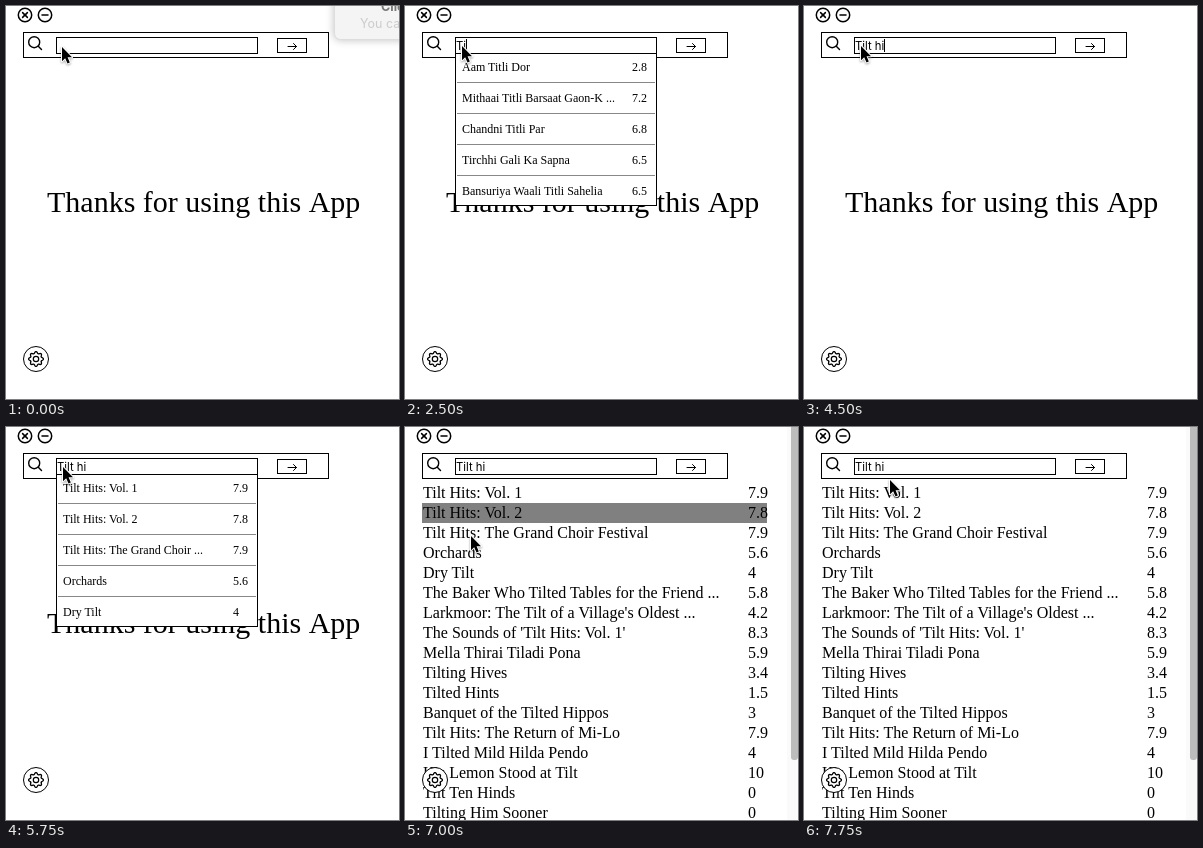
These frames come from a looping animation (393x393 px, 8 s). An HTML page:

```html
<!DOCTYPE html>
<html lang="en">
<head>
<meta charset="utf-8">
<title>Movie search</title>
<style>
  html, body { margin: 0; height: 100%; overflow: hidden; background: #fff; }
  svg { display: block; width: 100%; height: 100%; }
  text { font-family: "Liberation Serif", "Times New Roman", serif; white-space: pre; }
  .ui { font-family: Inter, sans-serif; }
  .line { fill: none; stroke: #000; }
  .box { fill: #fff; stroke: #000; }
  .round { stroke-linecap: round; stroke-linejoin: round; }
  #thanks { font-kerning: none; }
  #cursor { filter: drop-shadow(0 1px 1px rgba(0, 0, 0, .35)); }
</style>
</head>
<body>
<svg viewBox="0 0 393 393">
  <defs>
    <filter id="blur" x="-30%" y="-50%" width="160%" height="200%"><feGaussianBlur stdDeviation="4"/></filter>
  </defs>
  <text id="thanks" x="41" y="206" font-size="30">Thanks for using this App</text>

  <g id="results">
    <rect id="hover" x="17" width="345" height="20" fill="#808080"/>
    <g id="rows" font-size="16"></g>
    <rect x="382" width="11" height="393" fill="#fafafa"/>
    <rect x="386" y="-6" width="7" height="339" rx="3" fill="#bcbcbc"/>
  </g>

  <g class="line round" stroke-width="1.5">
    <circle cx="19" cy="9" r="6.7"/>
    <path d="M16.6 6.6l4.8 4.8m0-4.8l-4.8 4.8"/>
    <circle cx="39" cy="9" r="6.7"/>
    <path d="M36 9h6"/>
  </g>

  <rect class="line" x="17.5" y="26.5" width="305" height="25"/>
  <g class="line round" stroke-width="1.4">
    <circle cx="28.2" cy="36.2" r="5.5"/>
    <path d="M32.3 40.3l3.2 3.2"/>
  </g>
  <rect class="box" x="271.5" y="32.5" width="29" height="14"/>
  <path class="line round" d="M282 40.5h8.5m-3-3l3 3-3 3"/>
  <rect class="box" x="50.5" y="31.5" width="201" height="16"/>
  <text id="query" class="ui" x="51" y="44" font-size="11.3"></text>
  <rect id="caret" y="33" width="1" height="13"/>

  <g id="drop">
    <rect class="box" x="50.5" y="47.5" width="201" height="152"/>
    <path d="M52 76.5H250M52 107.5H250M52 138.5H250M52 169.5H250" stroke="#888"/>
    <g id="hints" font-size="12"></g>
  </g>

  <g transform="translate(30 353)">
    <circle class="box" r="12.5"/>
    <path id="gear" class="line round" stroke-width="1.3"/>
    <circle class="line" r="2.7" stroke-width="1.2"/>
  </g>

  <g id="tip">
    <rect x="328" y="-12" width="90" height="46" rx="6" fill="#000" opacity=".25" filter="url(#blur)"/>
    <rect x="328.5" y="-12" width="90" height="45.5" rx="6" fill="#f4f4f4" stroke="#ddd"/>
    <text class="ui" x="375" y="5" font-size="12.5" font-weight="700" fill="#777">Click</text>
    <text class="ui" x="354" y="22" font-size="12.5" fill="#ccc">You can</text>
  </g>

  <path id="cursor" class="round" d="M0 0V14.2L3.2 11.2 5.5 16.4 7.8 15.4 5.6 10.3H10Z"
    stroke="#fff" stroke-width="2" paint-order="stroke"/>
</svg>
<script>
const $ = id => document.getElementById(id);
const LOOP = 8000;

const vol1 = ["Tilt Hits: Vol. 1", 7.9], vol2 = ["Tilt Hits: Vol. 2", 7.8];
const orchards = ["Orchards", 5.6], dry = ["Dry Tilt", 4];

const hintLists = {
  T: [["Ten Paper Boats", 7.1], ["Tea for the Lodger", 6.4], ["Tin Weather", 6.9],
    ["Two Quiet Harbours", 7.3], ["The Lantern Clerk", 6.2]],
  Ti: [["Aam Titli Dor", 2.8], ["Mithaai Titli Barsaat Gaon-K ...", 7.2], ["Chandni Titli Par", 6.8],
    ["Tirchhi Gali Ka Sapna", 6.5], ["Bansuriya Waali Titli Sahelia", 6.5]],
  Til: [["Tiles of Marrow Lane", 6.7], ["Tilda Goes North", 6.3], vol1,
    ["Tillage", 5.9], ["Until the Kiln", 6.1]],
  Tilt: [vol1, vol2, ["A Barn on a Tilt", 6.2], ["Lessons in Tilt", 6.1], ["I Tilt Boards", 6.1]],
  "Tilt hi": [vol1, vol2, ["Tilt Hits: The Grand Choir ...", 7.9], orchards, dry]
};

const movies = [vol1, vol2, ["Tilt Hits: The Grand Choir Festival", 7.9], orchards, dry,
  ["The Baker Who Tilted Tables for the Friend ...", 5.8],
  ["Larkmoor: The Tilt of a Village's Oldest ...", 4.2],
  ["The Sounds of 'Tilt Hits: Vol. 1'", 8.3],
  ["Mella Thirai Tiladi Pona", 5.9], ["Tilting Hives", 3.4], ["Tilted Hints", 1.5],
  ["Banquet of the Tilted Hippos", 3], ["Tilt Hits: The Return of Mi-Lo", 7.9],
  ["I Tilted Mild Hilda Pendo", 4], ["His Lemon Stood at Tilt", 10],
  ["Tilt Ten Hinds", 0], ["Tilting Him Sooner", 0]];

// Timelines: each entry holds until the next one.
const typing = [[0, "", 51], [2250, "T", 58], [2500, "Ti", 61], [2750, "Til", 64],
  [3000, "Tilt", 67], [3750, "Tilt ", 70], [4000, "Tilt h", 77], [4250, "Tilt hi", 80]];
const pointer = [[0, 56, 41], [250, 57, 40], [6750, 57, 60], [7000, 66, 109],
  [7250, 69, 117], [7500, 79, 74], [7750, 86, 53]];
const hints = [[0, ""], [2250, "T"], [2500, "Ti"], [2750, "Til"], [3000, "Tilt"],
  [4250, "Tilt hi"], [4500, ""], [4750, "Tilt hi"], [6000, ""]];
const hovered = [[0, -1], [7000, 1], [7250, 3], [7500, 0], [7750, -1]];
const caretOn = [[500, 1000], [1500, 2000], [2250, 3500], [3750, 4750], [5250, 5750]];

const at = (line, t) => line.findLast(k => k[0] <= t);
const show = (id, on) => $(id).style.display = on ? "" : "none";

const table = (list, x, scoreX, y, step) => list.map(([name, score], i) =>
  `<text x="${x}" y="${y + i * step}">${name}</text>` +
  `<text x="${scoreX}" y="${y + i * step}">${score}</text>`).join("");

// Eight soft teeth around a circle.
function gearPath() {
  const pts = [];
  for (let i = 0; i < 96; i++) {
    const a = i * Math.PI / 48, r = 6.5 + .9 * Math.cos(8 * a);
    pts.push((r * Math.cos(a)).toFixed(2) + " " + (r * Math.sin(a)).toFixed(2));
  }
  return "M" + pts.join("L") + "Z";
}

$("gear").setAttribute("d", gearPath());
$("rows").innerHTML = table(movies, 18, 343, 71, 20);

let shownHints = "";
function draw(t) {
  const [, word, caretX] = at(typing, t);
  const [, x, y] = at(pointer, t);
  const key = at(hints, t)[1];
  const row = at(hovered, t)[1];
  const listing = t >= 6000;

  $("query").textContent = word;
  $("caret").setAttribute("x", caretX);
  show("caret", caretOn.some(([from, to]) => t >= from && t < to));
  $("cursor").setAttribute("transform", `translate(${x} ${y})`);

  if (key && key !== shownHints) {
    $("hints").innerHTML = table(hintLists[key], 57, 227, 65, 31);
    shownHints = key;
  }
  show("drop", key);
  show("tip", t < 250);
  show("thanks", !listing);
  show("results", listing);
  show("hover", row >= 0);
  $("hover").setAttribute("y", 56 + row * 20);
}

const start = performance.now();
function tick() {
  draw((performance.now() - start) % LOOP);
  requestAnimationFrame(tick);
}
tick();
</script>
</body>
</html>
```
